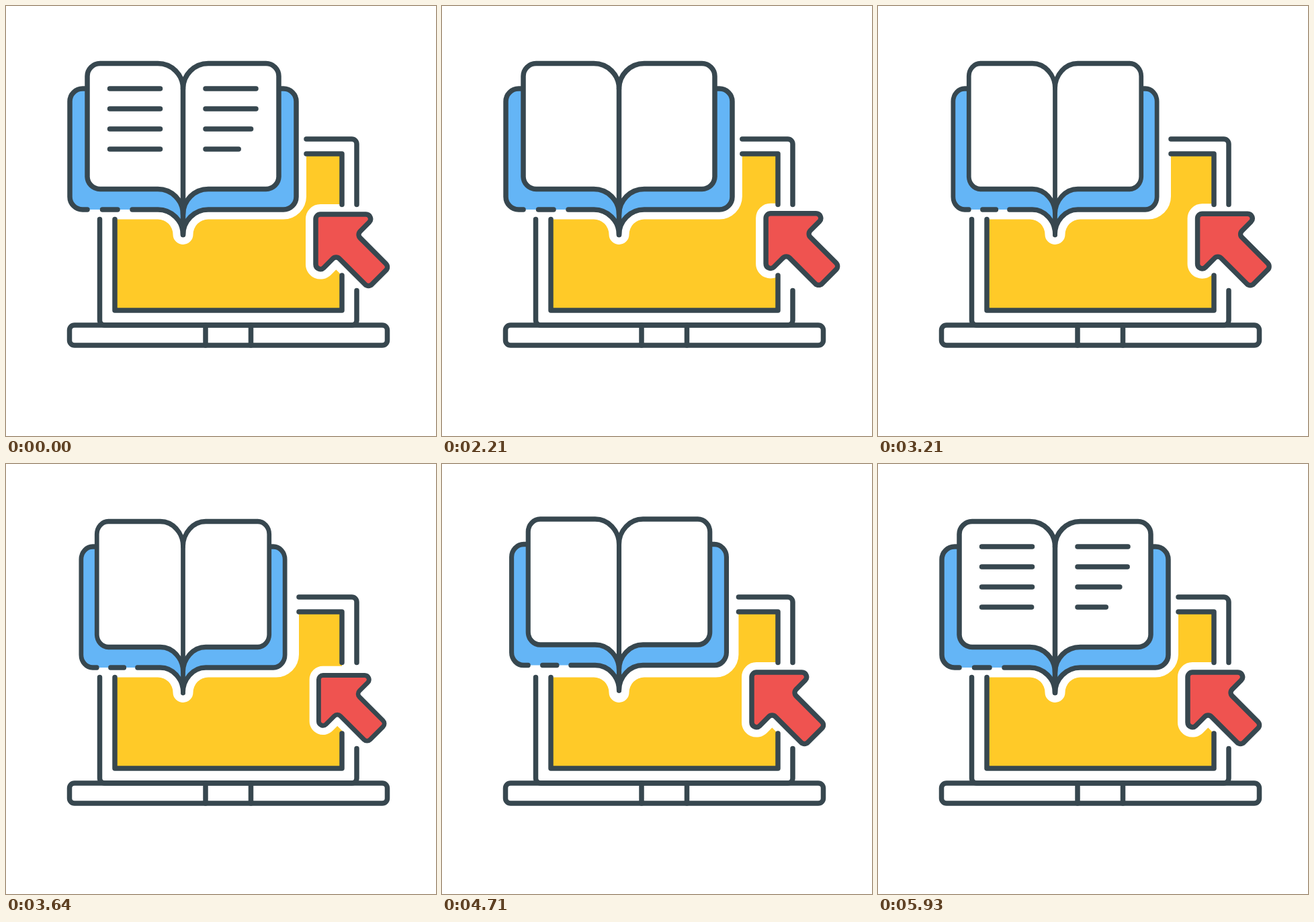
An HTML page for the animation above (6000 ms loop, 640 px wide and 640 px high).

```html
<!DOCTYPE html>
<html lang="en">
<head>
<meta charset="utf-8">
<title>Online book</title>
<style>
  html, body { margin: 0; width: 100%; height: 100%; overflow: hidden; background: #fff; }
  svg { display: block; width: 100vw; height: 100vh; }
  .ink { fill: none; stroke: #37474f; stroke-width: 7.5; stroke-linecap: round; stroke-linejoin: round; }
  .halo { fill: #fff; stroke: #fff; stroke-width: 30; stroke-linejoin: round; }
</style>
</head>
<body>
<svg viewBox="0 0 640 640">
  <path id="screen" fill="#ffca28"/>
  <g class="pointer"><path class="halo arrow"/></g>

  <g class="ink">
    <path id="edges"/>
    <path d="M139.5 317.5V467.5a7.5 7.5 0 0 0 7.5 7.5H514.5a7.5 7.5 0 0 0 7.5-7.5V423.5"/>
    <path d="M162 317.5V453H500V401"/>
    <rect x="94.5" y="475" width="473" height="30" rx="7.5"/>
    <path d="M297 475V505M364.5 475V505"/>
  </g>

  <g id="book">
    <path fill="#64b5f6" d="M121 123H114a19 19 0 0 0-19 19V284a19 19 0 0 0 19 19H226a37.5 37.5 0 0 1 37.5 37.5A37.5 37.5 0 0 1 301 303H413a19 19 0 0 0 19-19V142a19 19 0 0 0-19-19Z"/>
    <g class="ink">
      <path d="M121 123H114a19 19 0 0 0-19 19V284a19 19 0 0 0 19 19H121M143.5 303H166M188 303H226a37.5 37.5 0 0 1 37.5 37.5A37.5 37.5 0 0 1 301 303H413a19 19 0 0 0 19-19V142a19 19 0 0 0-19-19H406"/>
      <path fill="#fff" d="M263.5 123A37.5 37.5 0 0 0 226 85.5H140a19 19 0 0 0-19 19V253.5a19 19 0 0 0 19 19H226A37.5 37.5 0 0 1 263.5 310A37.5 37.5 0 0 1 301 272.5H387a19 19 0 0 0 19-19V104.5a19 19 0 0 0-19-19H301A37.5 37.5 0 0 0 263.5 123Z"/>
      <path d="M263.5 123V340.5"/>
      <g id="text"></g>
    </g>
  </g>

  <g class="pointer"><path class="ink arrow" style="fill:#ef5350"/></g>
</svg>
<script>
const LOOP = 6000;
const ROW_LENGTH = 75;
const SPINE = 263.5;
const $ = id => document.getElementById(id);

const ramp = (t, from, to) => Math.min(1, Math.max(0, (t - from) / (to - from)));
const ease = (t, from, to) => 0.5 - 0.5 * Math.cos(Math.PI * ramp(t, from, to));

// Closed polygon with circular corners
function roundPoly(points, radius) {
  const n = points.length;
  const parts = points.map(([x, y], i) => {
    const [ax, ay] = points[(i + n - 1) % n];
    const [bx, by] = points[(i + 1) % n];
    const la = Math.hypot(ax - x, ay - y), lb = Math.hypot(bx - x, by - y);
    const ux = (ax - x) / la, uy = (ay - y) / la;
    const vx = (bx - x) / lb, vy = (by - y) / lb;
    const cut = radius / Math.tan(Math.acos(ux * vx + uy * vy) / 2);
    const sweep = ux * vy - uy * vx < 0 ? 1 : 0;
    return `${x + ux * cut} ${y + uy * cut}A${radius} ${radius} 0 0 ${sweep} ${x + vx * cut} ${y + vy * cut}`;
  });
  return 'M' + parts.join('L') + 'Z';
}

const arrow = roundPoly([
  [461, 310], [552.5, 310], [522.2, 340.3], [570.4, 388.5],
  [539.5, 419.4], [491.3, 371.2], [461, 401.5]
], 7);
document.querySelectorAll('.arrow').forEach(el => el.setAttribute('d', arrow));
const pointers = document.querySelectorAll('.pointer');

const rows = [];
for (let page = 0; page < 2; page++) {
  for (let i = 0; i < 4; i++) {
    const el = document.createElementNS('http://www.w3.org/2000/svg', 'path');
    $('text').append(el);
    rows.push({
      el,
      x: page ? 297 : 154.5,
      y: 123 + 30 * i,
      erase: 956 + 236 * page + 155 * i,
      write: 5051 + 226 * page + 113.5 * i
    });
  }
}

function drawRows(t) {
  // Writing runs on past the loop seam
  const u = t < 600 ? t + 5965 : t;
  const writing = u > 5000;
  for (const { el, x, y, erase, write } of rows) {
    const a = writing ? 0 : ease(u, erase, erase + 542);
    const b = writing ? ease(u, write, write + 580) : 1;
    const visible = b - a > 0.002;
    el.setAttribute('d', visible ? `M${x + a * ROW_LENGTH} ${y}H${x + b * ROW_LENGTH}` : '');
  }
}

function drawScreen(t) {
  const x = 447 - 11 * (ramp(t, 2200, 2960) - ramp(t, 4335, 5095));
  $('screen').setAttribute('d',
    'M162 317.5H226a22.5 22.5 0 0 1 22.5 22.5a15 15 0 0 0 30 0a22.5 22.5 0 0 1 22.5-22.5' +
    `H${x - 34}a34 34 0 0 0 34-34V220H500V453H162Z`);
  $('edges').setAttribute('d',
    `M${x} 198H514.5a7.5 7.5 0 0 1 7.5 7.5V295.5M${x} 220H500V295.5`);
}

function drawBook(t) {
  const width = 1 - 0.1 * (ease(t, 2200, 2960) - ease(t, 4335, 5095));
  const lift = -9 * (ease(t, 3650, 4200) - ease(t, 4370, 4960));
  $('book').setAttribute('transform',
    `translate(${SPINE} ${lift}) scale(${width} 1) translate(${-SPINE} 0)`);
}

function drawPointer(t) {
  const away = ease(t, 1850, 2500) - ease(t, 2880, 3470);
  const size = 1 - 0.15 * (ease(t, 3470, 3790) - ease(t, 3790, 4200));
  const move = `translate(${514 + 36 * away} ${363.5 - 2 * away}) scale(${size}) translate(-514 -363.5)`;
  pointers.forEach(el => el.setAttribute('transform', move));
}

function draw(t) {
  drawScreen(t);
  drawBook(t);
  drawRows(t);
  drawPointer(t);
}

const start = performance.now();
function tick() {
  draw((performance.now() - start) % LOOP);
  requestAnimationFrame(tick);
}
tick();
</script>
</body>
</html>
```
